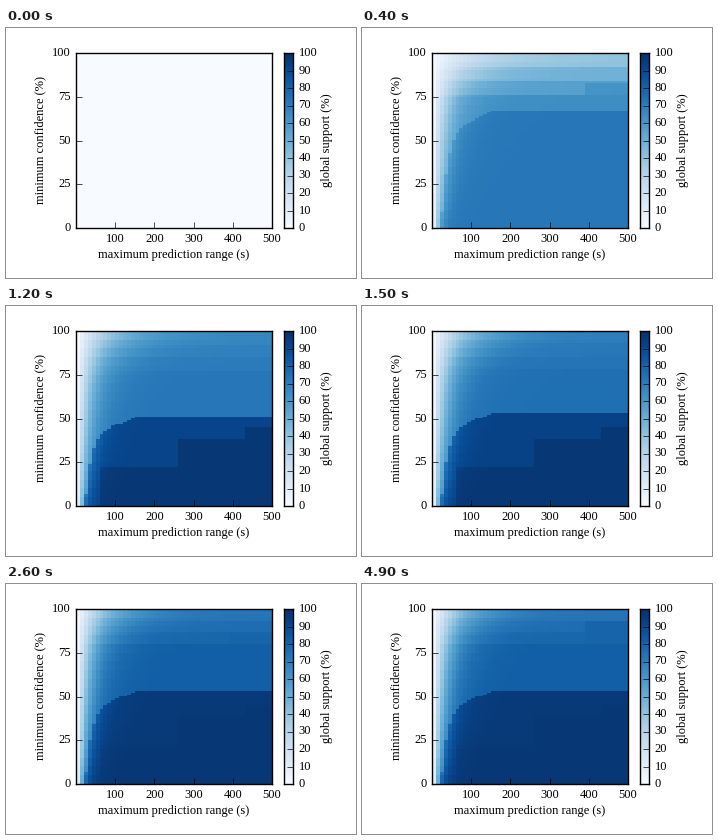
A matplotlib script that plays this animation: 350 px wide and 250 px high, repeating every 5 s.

```python
import numpy as np
import matplotlib.pyplot as plt
from matplotlib.animation import FuncAnimation

W, H, DPI = 350, 250, 100
FRAMES = 50

plt.rcParams.update({
    "font.family": "Liberation Serif", "font.size": 9,
    "axes.linewidth": 1.0,
    "xtick.direction": "in", "ytick.direction": "in",
    "xtick.major.size": 4, "ytick.major.size": 4,
    "xtick.major.width": 0.5, "ytick.major.width": 0.5,
    "xtick.major.pad": 3.3, "ytick.major.pad": 4,
})

# One cell per 10 s of range and 1 % of confidence, top row first.
conf, reach = np.meshgrid(np.arange(99.5, 0, -1), np.arange(2, 500, 10),
                          indexing="ij")


def ease(t, start, end):
    u = np.clip((t - start) / (end - start), 0, 1)
    return u * u * (3 - 2 * u)


def saturation(t):
    """Share of the final level reached at each range; slower when the
    confidence demanded is high."""
    c = (conf // 5 * 5 + 2.5) / 100
    scale = 12 + 35 * c + (40 + 70 * np.exp(-t / 10)) * c ** 8
    return 1 - np.exp(-reach / scale)


def support(t):
    if t > 34:
        t -= t % 3  # late updates are rare
    start = 1 - np.exp(-t / 1.2)
    top = 74 * (1 - np.exp(-t / 5))
    middle = start * (65 + 17 * ease(t, 0, 26))
    low = start * (75 + 17 * ease(t, 4, 7) + 4 * ease(t, 10, 26))

    # Three steps from the middle band up to full confidence.
    middle_edge = round(76 + 4 * ease(t, 7, 26))
    step = np.ceil((conf - middle_edge) / (100 - middle_edge) * 3) / 3
    level = middle - (middle - top) * np.clip(step, 0, 1)
    far_edge = 83 + 3 * ease(t, 7, 15) + 7 * (t > 42)
    far = (reach > 390) & (conf < far_edge)
    level[far] = np.maximum(level[far], middle - 2)

    # The low band narrows towards short ranges and has a darker core.
    low_edge = 67 - 21 * ease(t, 4, 7) + 7 * ease(t, 7, 15)
    taper = (0.75 * (1 - np.exp(-(reach - 20) / 15))
             + 0.25 * np.minimum(reach / 150, 1))
    level[conf < low_edge * taper] = low
    core_edge = 22 + 16 * (reach > 260) + 7 * (reach > 430)
    core = (conf < core_edge) & (reach > 60)
    level[core] = min(low + 5 * ease(t, 4, 7), 97)
    return level * saturation(t)


def pixel_axes(left, top, width, height):
    return fig.add_axes([left / W, 1 - (top + height) / H,
                         width / W, height / H])


def percent_ticks(axes, step):
    axes.set_yticks(range(0, 101, step))
    for tick_label in axes.get_yticklabels():
        tick_label.set_va("center")


def label(x, y, text, **kw):
    fig.text(x / W, 1 - y / H, text, ha="center", **kw)


fig = plt.figure(figsize=(W / DPI, H / DPI), dpi=DPI, facecolor="white")

ax = pixel_axes(70, 25, 196, 175)
image = ax.imshow(support(0), cmap="Blues", vmin=0, vmax=100, aspect="auto",
                  interpolation="nearest", extent=(0, 500, 0, 100))
ax.set_xticks(range(100, 501, 100))
percent_ticks(ax, 25)

bar = pixel_axes(278.25, 25, 8.75, 175)
bar.imshow(np.linspace(0, 100, 256)[:, None], cmap="Blues", aspect="auto",
           origin="lower", extent=(0, 1, 0, 100))
bar.set_xticks([])
bar.yaxis.tick_right()
percent_ticks(bar, 10)

label(168, 230, "maximum prediction range (s)", va="baseline")
label(34, 112.5, "minimum confidence (%)", va="center", rotation=90)
label(321, 112.5, "global support (%)", va="center", rotation=90)


def update(frame):
    image.set_data(support(frame))
    return [image]


anim = FuncAnimation(fig, update, frames=FRAMES, interval=100,
                     repeat=True, repeat_delay=0, blit=False)
plt.show()
```
